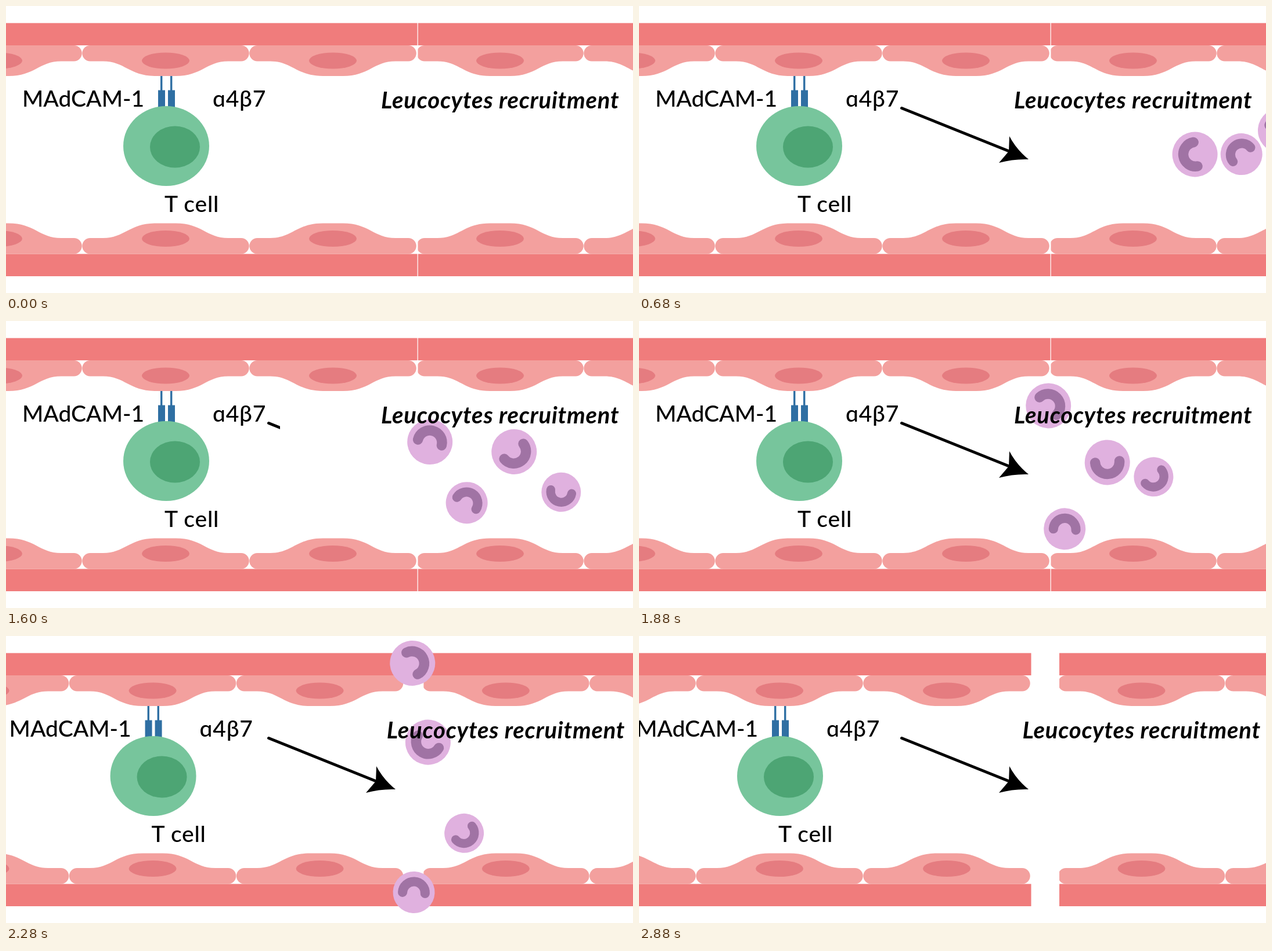
An HTML page that plays this animation: 1080x496 px, repeating every 3 s.

```html
<!DOCTYPE html>
<html lang="en">
<head>
<meta charset="utf-8">
<title>Leucocytes recruitment</title>
<style>
  html, body { margin: 0; width: 100%; height: 100%; overflow: hidden; background: #fff; }
  svg { display: block; width: 100vw; height: 100vh; }
  text { font: 500 39px Lato, "Noto Sans", sans-serif; }
  .wide { letter-spacing: .02em; }
  .title { font-size: 40px; font-weight: 700; font-style: italic; }
  .band { fill: #f07c7c; }
  .lining { fill: #f3a09e; }
  .core { fill: #e57c80; }
  .receptor { fill: #2f6fa3; }
</style>
</head>
<body>
<svg viewBox="0 0 1080 496">
  <defs>
    <g id="lining">
      <path class="lining" d="M-130 68H130a13.7 13.7 0 0 1 0 27.5H108C70 95.5 63 121 17 121H-17C-63 121 -70 95.5 -108 95.5H-130a13.7 13.7 0 0 1 0 -27.5z"/>
      <ellipse class="core" cy="94.5" rx="41" ry="14"/>
    </g>
    <g id="leftWall">
      <path class="band" d="M-10 29.5H708.5V68H-10z"/>
      <use href="#lining" x="-13"/><use href="#lining" x="275"/><use href="#lining" x="563"/>
    </g>
    <g id="rightWall" clip-path="url(#rightSide)">
      <path class="band" d="M709.5 29.5H1100V68H709.5z"/>
      <use href="#lining" x="851"/><use href="#lining" x="1139"/>
    </g>
    <clipPath id="rightSide"><rect x="709.5" width="700" height="496"/></clipPath>
    <clipPath id="wipe"><rect id="wipeBox" x="449" y="160" height="130"/></clipPath>
  </defs>

  <g id="left">
    <use href="#leftWall"/>
    <use href="#leftWall" transform="matrix(1 0 0 -1 0 496.5)"/>
    <path class="receptor" d="M266 121h3.4v25h-3.4zM283 121h3.4v25h-3.4zM262 145.5h12v32h-12zM279 145.5h12v32h-12z"/>
    <ellipse cx="276" cy="242" rx="74" ry="69" fill="#77c59c"/>
    <ellipse cx="291" cy="243.5" rx="43" ry="36" fill="#4da574"/>
    <text x="28" y="174">MAdCAM-1</text>
    <text class="wide" x="356" y="174">ɑ4β7</text>
    <text class="wide" x="273" y="356">T cell</text>
  </g>
  <g id="rightWalls">
    <use href="#rightWall"/>
    <use href="#rightWall" transform="matrix(1 0 0 -1 0 496.5)"/>
  </g>
  <g id="cells"></g>
  <g clip-path="url(#wipe)">
    <path d="M452.500 176.500L640 252" stroke="#000" stroke-width="5" stroke-linecap="round"/>
    <path d="M638 225Q650 248 671 265Q645 264 620 271L637 251z"/>
  </g>
  <text id="title" class="title wide" x="646" y="177">Leucocytes recruitment</text>
</svg>
<script>
const LOOP = 3000, STEP = 40, LAST = 2880, GAP_X = 700;
const $ = id => document.getElementById(id);
const clamp = v => Math.min(1, Math.max(0, v));
const easeInOut = u => u < .5 ? 2 * u * u : 1 - 2 * (1 - u) ** 2;
// Zero for negative v, v for positive v, with a rounded corner
const ramp = (v, round = 35) => round * Math.log1p(Math.exp(v / round));

// Cells drift left until `arrive`, leave the lane from `turn` on, and roll until `still`
const cells = [
  { r: 39, side: -1, lane: 285, drift: .268, arrive: 1641, climb: .25, turn: 1328, still: 2000, rest: 153 },
  { r: 36, side: 1, lane: 225, drift: .268, arrive: 1940, climb: .21, turn: 1242, still: 1690, rest: -267 },
  { r: 39, side: -1, lane: 245, drift: .25, arrive: 2300, climb: .4, turn: 2140, still: 2180, rest: 303 },
  { r: 34, side: 1, lane: 268, drift: .25, arrive: 2625, climb: .38, turn: 2090, still: 1760, rest: -130 }
];

function addCell(cell) {
  cell.node = document.createElementNS("http://www.w3.org/2000/svg", "g");
  cell.node.innerHTML = `<circle r="39" fill="#e0b1df"/>
    <path d="M1 -21A21 21 0 1 0 1 21" fill="none" stroke="#a073a4" stroke-width="17.500" stroke-linecap="round"/>`;
  $("cells").append(cell.node);
}

function moveCell({ r, side, lane, drift, arrive, climb, turn, still, rest, node }, t) {
  const ahead = ramp(drift * (arrive - t));
  const sway = Math.min(30, .11 * ahead) * Math.cos((t - 690) / 940 * 2 * Math.PI);
  const y = lane + side * (ramp(climb * (t - turn)) + sway);
  const spin = side < 0 ? -.123 : .315;
  const angle = rest + Math.sign(spin) * ramp(Math.abs(spin) * (still - t), 10);
  node.setAttribute("transform", `translate(${GAP_X + ahead} ${y}) rotate(${angle}) scale(${r / 39})`);
}

function draw(t) {
  const open = easeInOut(clamp((t - 1890) / 650));
  $("left").setAttribute("transform", `translate(${-33 * open})`);
  for (const id of ["rightWalls", "title"]) $(id).setAttribute("transform", `translate(${14.5 * open})`);
  $("wipeBox").setAttribute("width", 223 * clamp((t - 18) % 776 / 290));
  for (const cell of cells) moveCell(cell, t);
}

function frame() {
  const t = performance.now() % LOOP;
  draw(Math.min(LAST, Math.floor(t / STEP) * STEP));
  requestAnimationFrame(frame);
}

cells.forEach(addCell);
frame();
</script>
</body>
</html>
```
